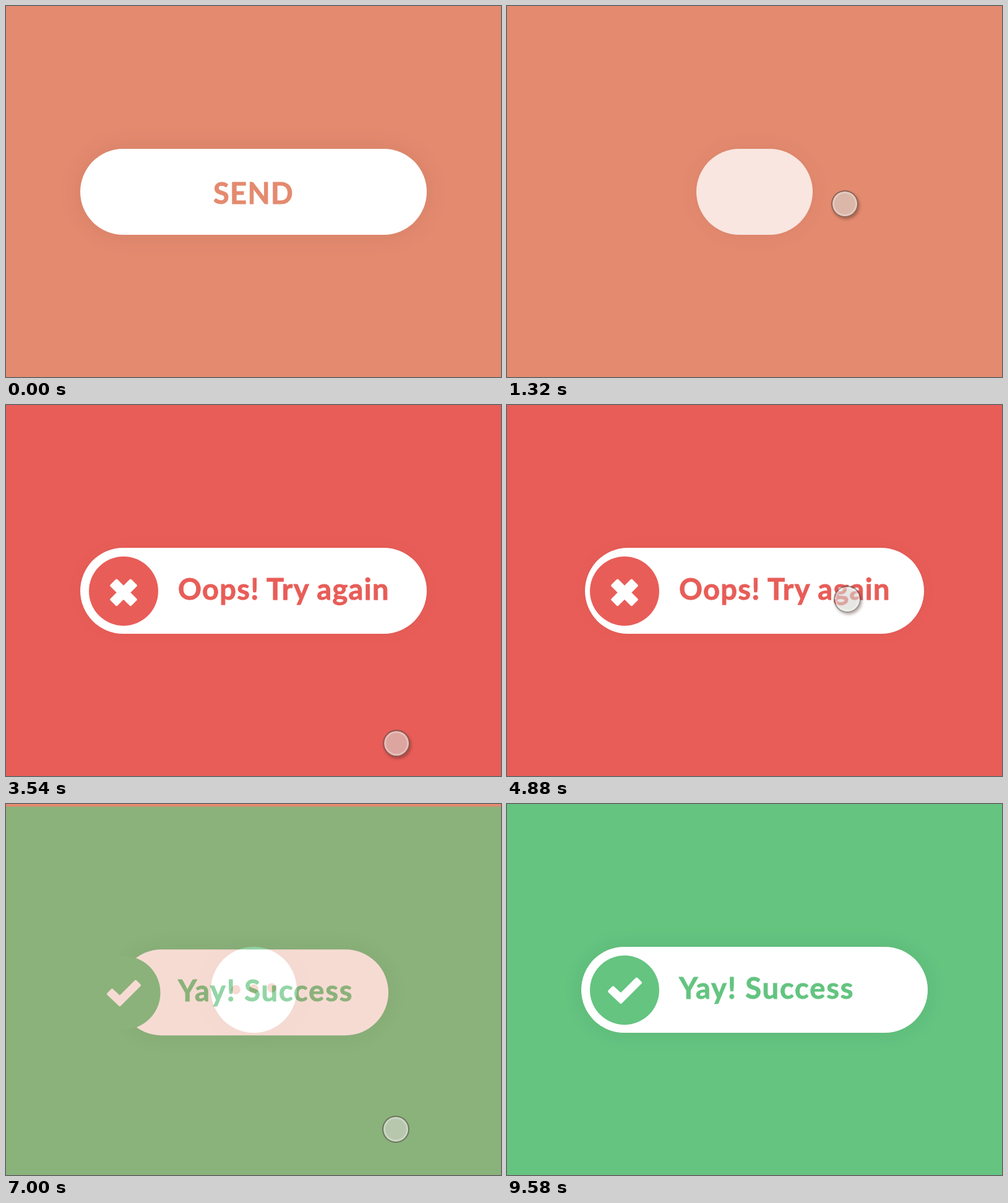
Animation of 800 by 600 pixels, one loop 9.6 s. Source, as an HTML page:

```html
<!DOCTYPE html>
<html lang="en">
<head>
<meta charset="utf-8">
<title>Send button</title>
<style>
  html, body { margin: 0; width: 100%; height: 100%; overflow: hidden; }
  #stage { position: relative; width: 800px; height: 600px; overflow: hidden; background: #e48a6f; }
  .screen { position: absolute; inset: 0; color: var(--tone); background: var(--tone); }
  #base { --tone: #e48a6f; --shadow: 0 0 44px rgba(0, 0, 0, .07); }
  #error { --tone: #e85d58; --shadow: 0 0 30px rgba(0, 0, 0, .03); opacity: 0; }
  #success { --tone: #64c480; --shadow: 0 0 36px rgba(0, 0, 0, .07); opacity: 0; }
  .pill {
    position: absolute; left: 120px; top: 231px; width: 560px; height: 139px;
    border-radius: 70px; background: #fff; box-shadow: var(--shadow);
  }
  svg { position: absolute; inset: 0; fill: currentColor; }
  text {
    font: 700 47px Lato, "Open Sans", sans-serif; letter-spacing: 1.3px;
    stroke: currentColor; stroke-width: .9;
  }
  #success text { letter-spacing: 1.9px; }
  .icon { fill: #fff; stroke: #fff; stroke-width: 4; stroke-linejoin: round; }
  #cursor {
    position: absolute; left: -22px; top: -22px; width: 44px; height: 44px;
    box-sizing: border-box; border-radius: 50%;
    border: 2px solid rgba(90, 80, 75, .62);
    background: rgba(214, 214, 208, .6) padding-box;
  }
</style>
</head>
<body>
<div id="stage">
  <div class="screen" id="base">
    <div class="pill"></div>
    <svg width="800" height="600">
      <text id="send" x="400" y="320" text-anchor="middle">SEND</text>
      <g id="dots">
        <circle cx="371.5" cy="300.3" r="7.5"/>
        <circle cx="400.5" cy="300.3" r="7.5"/>
        <circle cx="429.5" cy="300.3" r="7.5"/>
      </g>
    </svg>
  </div>
  <div class="screen" id="error">
    <div class="pill"></div>
    <svg width="800" height="600">
      <circle class="badge" cx="190" cy="301" r="56"/>
      <g class="icon" transform="translate(190 303.3) rotate(45)">
        <rect x="-22" y="-6" width="44" height="12"/>
        <rect x="-6" y="-22" width="12" height="44"/>
      </g>
      <text x="278" y="315">Oops! Try again</text>
    </svg>
  </div>
  <div class="screen" id="success">
    <div class="pill"></div>
    <svg width="800" height="600">
      <circle class="badge" cx="190" cy="301" r="56"/>
      <path class="icon" d="M165 303l6.5-6.5 12.5 11.5 25.5-25.5 6.5 6.5-32 32z"/>
      <text x="278" y="315">Yay! Success</text>
    </svg>
  </div>
  <div id="cursor"></div>
</div>
<script>
  const LOOP = 9600, SEND = 960, FAIL = 3050, RETRY = 4780, DONE = 6870;
  const WIDE = 560, ROUND = 139;

  const $ = selector => document.querySelector(selector);
  const base = $('#base .pill'), send = $('#send'), dots = $('#dots'), cursor = $('#cursor');

  const progress = (t, start, length) => Math.min(1, Math.max(0, (t - start) / length));
  const mix = (a, b, p) => a + (b - a) * p;
  const easeInOut = p => p < .5 ? 4 * p ** 3 : 1 - 4 * (1 - p) ** 3;
  const easeOut = p => 1 - (1 - p) ** 3;
  const smooth = p => p * p * (3 - 2 * p);

  // time, x, y
  const path = [
    [0, 840, 640], [860, 546, 320], [1340, 546, 320], [1900, 625, 523],
    [2680, 626, 524], [2960, 628, 528], [3960, 633, 559], [4280, 633, 559],
    [4800, 550, 314], [4960, 550, 314], [5600, 633, 534], [6060, 630, 530],
    [7000, 630, 526], [7900, 633, 530], [8600, 648, 640], [LOOP, 648, 640]
  ];

  function drawCursor(t) {
    const i = path.findIndex(point => point[0] > t);
    const [t0, x0, y0] = path[i - 1], [t1, x1, y1] = path[i];
    const p = smooth(progress(t, t0, t1 - t0));
    cursor.style.transform = `translate(${mix(x0, x1, p)}px, ${mix(y0, y1, p)}px)`;
    const shade = .35 * (1 - progress(t, 5000, 400));
    cursor.style.boxShadow =
      `inset 0 0 0 3px rgba(255,255,255,.28), 2px 3px 4px rgba(60,30,20,${shade})`;
  }

  function setWidth(pill, width) {
    pill.style.width = width + 'px';
    pill.style.left = 400 - width / 2 + 'px';
  }

  const shrunk = (t, start) => mix(WIDE, ROUND, easeInOut(progress(t, start, 520)));

  function drawBase(t) {
    const retrying = t >= RETRY, start = retrying ? RETRY : SEND;
    const p = progress(t, start, 520);
    setWidth(base, shrunk(t, start));
    base.style.opacity = retrying ? p : 1 - p * (1 - p);
    send.style.opacity = 1 - progress(t, SEND, 190);
    dots.style.opacity = progress(t, start + 520, 120);
    [...dots.children].forEach((dot, i) => {
      const since = t - start - 651 - i * 283;
      const hop = since < 0 ? 1 : Math.min(1, since % 970 / 330);
      dot.setAttribute('transform', `translate(0 ${-9.5 * Math.sin(Math.PI * hop)})`);
    });
  }

  function drawResult(id, t, start, end) {
    const screen = $(id);
    const fade = t < end ? 1 : 1 - progress(t, end + 130, 390);
    const settle = (1 - progress(t, start, 240)) ** 2;
    screen.style.opacity = progress(t, start, 187) * fade;
    screen.style.transform = `translateY(${20 * settle}px)`;
    screen.querySelector('.badge').setAttribute('r', 56 * (1 + .3 * settle));
    setWidth(screen.querySelector('.pill'), t < end
      ? mix(ROUND, WIDE, easeOut(progress(t, start, 390)))
      : shrunk(t, end));
  }

  let origin;
  function render(now) {
    origin ??= now;
    const t = (now - origin) % LOOP;
    drawBase(t);
    drawResult('#error', t, FAIL, RETRY);
    drawResult('#success', t, DONE, LOOP);
    drawCursor(t);
    requestAnimationFrame(render);
  }
  requestAnimationFrame(render);
</script>
</body>
</html>
```
